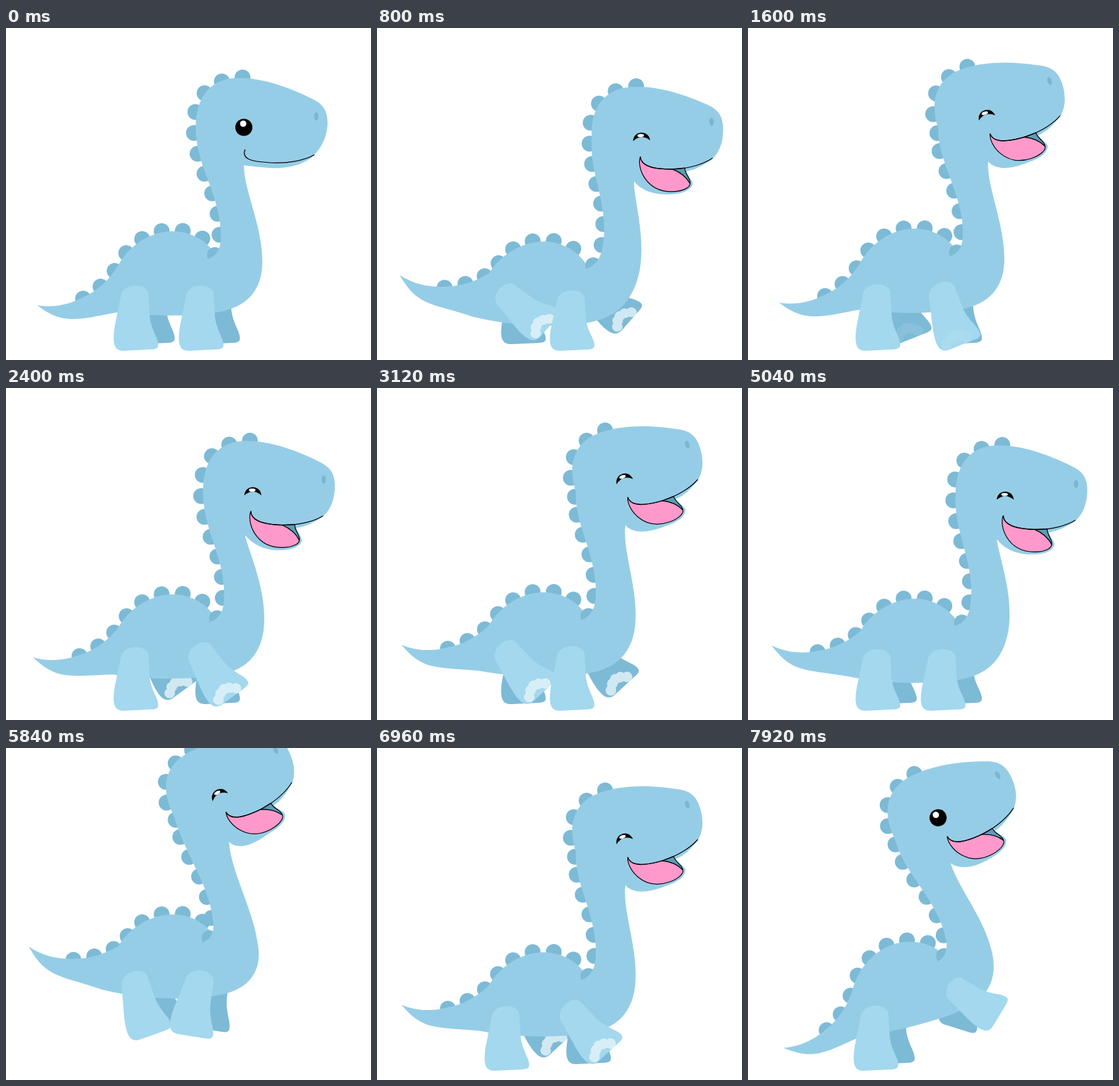
An HTML page for the animation above (8000 ms loop, 554x503 px).

```html
<!DOCTYPE html>
<html lang="en">
<head>
<meta charset="utf-8">
<title>Happy dinosaur</title>
<style>
html, body { margin: 0; width: 100%; height: 100%; overflow: hidden; background: #fff; }
svg { display: block; width: 100vw; height: 100vh; }
</style>
</head>
<body>
<svg viewBox="0 0 554 503" preserveAspectRatio="none">
  <g id="farLegs"></g>
  <g id="backBumps"></g>
  <path id="body" fill="#96cde6"/>
  <g id="neckBumps"></g>
  <path id="neck" fill="#96cde6"/>
  <g id="face">
    <ellipse cx="471" cy="134" rx="3.2" ry="6.2" fill="#7ab5d2"/>
    <g id="eyeOpen">
      <circle cx="361" cy="150.5" r="13"/>
      <circle cx="360" cy="145" r="4.8" fill="#fff"/>
    </g>
    <g id="eyeShut">
      <path d="M350.5 158C352 141.5 375 141.5 376.5 158C368 150.5 359 150.5 350.5 158Z"/>
      <ellipse cx="362.5" cy="150" rx="5" ry="2.4" fill="#fff"/>
    </g>
    <path id="smile" d="M363 184C357 198 372 202 395 203.5C425 207 455 200 468 192" fill="none" stroke="#000" stroke-width="1.2"/>
    <g id="laugh" stroke="#000" stroke-width="1.2" stroke-linejoin="round">
      <path d="M408 203L427 202C427 212 436 219 434 226C429 216 420 208 408 203Z" fill="#5f9db5"/>
      <path d="M360.5 182C354 197 366 237 408 237C425 237 434 231 434 226C429 216 420 208 408 203C385 202 361 199 360.5 182Z" fill="#ff99cb"/>
      <path d="M360.5 182C361 199 390 203 412 203C435 203 457 197 470 189" fill="none"/>
    </g>
  </g>
  <g id="nearLegs"></g>
</svg>
<script>
const $ = id => document.getElementById(id);
const LOOP = 8000, STEP = 80, CYCLE = 1280, START = 160, LAUGH = 240;
const JUMP = 4000, WALK = 6560, REAR = 7360, REARED = 7760, OPEN_EYE = 7920;
const DARK = '#7dbad6', LIGHT = '#a3d8ee';

const BODY = 'M47 420C75 425 100 417 117 408C140 398 158 380 170 360C190 324 225 308 252 308C285 308 308 326 320 346L360 400C350 420 325 432 290 434C250 437 205 436 168 431C140 436 120 441 100 441C78 441 62 431 47 420Z';
const NAPE = 'M308 349C318 346 326 336 326 318C327 290 318 262 310 240C300 212 288 185 288 150C288 115 302 80 345 76C385 73 430 90 462 106C480 114 488 124 488 143';
const JAW_SHUT = 'C488 165 478 182 468 192C455 207 425 214 400 212C385 211 370 209 361 208';
const JAW_OPEN = 'C488 165 481 180 470 190C455 200 442 206 429 207C432 216 439 222 438 227C434 238 418 241 404 241C385 241 367 235 352 218';
const CHEST = 'C361 245 389 300 389 352C390 385 376 412 345 424C325 432 300 434 280 434L270 400Z';
const LEG = 'M273 407C275 386 312 385 315 402L317 436C319 458 331 470 330 481Q330 487 318 487L277 489C263 489 260 478 264 452Z';
const BACK_RIDGE = 'M117 410C140 398 158 380 170 360C190 322 225 306 252 306C272 306 288 312 298 319';
const NECK_RIDGE = 'M317 344C322 337 324 328 324 318C325 290 318 262 309 240C298 212 285 185 285 150C285 115 300 78 359 75';

const clamp = v => Math.min(1, Math.max(0, v));
const mix = (a, b, k) => a + (b - a) * k;
const ease = (a, b, v) => {
  const u = clamp((v - a) / (b - a));
  return u * u * (3 - 2 * u);
};
// Eases up from a to b and down from c to d
const swell = (a, b, c, d, v) => ease(a, b, v) - ease(c, d, v);

function add(parent, tag, attrs) {
  const el = document.createElementNS('http://www.w3.org/2000/svg', tag);
  for (const k in attrs) el.setAttribute(k, attrs[k]);
  return parent.appendChild(el);
}

// Evenly spaced bumps along a ridge
function addBumps(parent, ridge, count) {
  const path = add(parent, 'path', { d: ridge, fill: 'none' });
  const gap = path.getTotalLength() / (count - 1);
  return Array.from({ length: count }, (_, i) => {
    const { x, y } = path.getPointAtLength(i * gap);
    return { x, y, el: add(parent, 'circle', { r: 12, fill: DARK }) };
  });
}

function addLeg(far, front) {
  const el = add($(far ? 'farLegs' : 'nearLegs'), 'g', {});
  add(el, 'path', { d: LEG, fill: far ? DARK : LIGHT });
  const puff = add(el, 'g', { fill: '#e6f4fa' });
  for (let i = 0; i < 5; i++)
    add(puff, 'circle', { cx: 277 + i * 8, cy: 480 - 9 * Math.sin(i * Math.PI / 4), r: 8 });
  return { far, front, el, puff };
}

const backBumps = addBumps($('backBumps'), BACK_RIDGE, 8);
const neckBumps = addBumps($('neckBumps'), NECK_RIDGE, 11);
const legs = [addLeg(true, true), addLeg(true, false), addLeg(false, false), addLeg(false, true)];

function turn(x, y, cx, cy, deg) {
  const a = deg * Math.PI / 180, c = Math.cos(a), s = Math.sin(a);
  return [cx + (x - cx) * c - (y - cy) * s, cy + (x - cx) * s + (y - cy) * c];
}

function warp(d, fn) {
  return d.replace(/([\d.]+) ([\d.]+)/g, (_, x, y) =>
    fn(+x, +y).map(v => v.toFixed(2)).join(' '));
}

function place(bumps, fn) {
  for (const { x, y, el } of bumps) {
    const [cx, cy] = fn(x, y);
    el.setAttribute('cx', cx);
    el.setAttribute('cy', cy);
  }
}

const show = (id, on) => $(id).setAttribute('display', on ? 'inline' : 'none');

// look: head raised, lean: neck forward, air: height of the jump
function walkPose(p) {
  return {
    look: swell(0, .125, .31, .56, p),
    lean: 38 * swell(.16, .56, .56, .85, p),
    air: 0
  };
}

function jumpPose(p) {
  const air = Math.sin(Math.PI * clamp((p - .28) / .44));
  const squat = swell(0, .12, .14, .28, p) + .9 * swell(.72, .8, .82, 1, p);
  return { look: 1.72 * air, lean: 28 * squat - 29 * air, air };
}

function draw(t) {
  const jumping = t >= JUMP && t < WALK;
  const time = Math.max(0, t - START);
  const rear = ease(REAR, REARED, t);
  const pose = (jumping ? jumpPose : walkPose)(time / CYCLE % 1);
  const look = mix(pose.look, .72, rear);
  const lean = pose.lean * (1 - rear);
  const air = pose.air;

  const lift = -55 * air;
  const sink = .45 * Math.max(0, lean) - 4 * look;
  const sway = Math.abs(lean);
  const tail = .65 * sway + 5 * look * ease(0, 12, sway);
  const tilt = -14 * rear;
  const nod = -18 * look;

  const torso = (x, y) => {
    const [tx, ty] = turn(x, y, 268, 307, tilt);
    return [tx - 27 * rear, ty + sink + lift - 13 * rear];
  };
  const trunk = (x, y) => torso(...turn(x, y, 185, 360, tail * clamp((190 - x) / 30)));
  const head = (x, y) => {
    const [hx, hy] = turn(x, y, 361, 150, nod);
    return torso(hx + 1.07 * lean - 3 * look - 10 * air, hy - 16.5 * look);
  };
  const neck = (x, y) => {
    const w = clamp((178 - y + .9 * (x - 285)) / 30);
    const bend = lean * clamp((390 - y) / 196) ** .8;
    const a = torso(x + bend, y), b = head(x, y);
    return [mix(a[0], b[0], w), mix(a[1], b[1], w)];
  };

  const laughing = t >= LAUGH;
  const shut = laughing && t < OPEN_EYE;
  $('body').setAttribute('d', warp(BODY, trunk));
  $('neck').setAttribute('d', warp(NAPE + (laughing ? JAW_OPEN : JAW_SHUT) + CHEST, neck));
  place(backBumps, trunk);
  place(neckBumps, neck);
  $('face').setAttribute('transform',
    `translate(${head(361, 150)}) rotate(${nod + tilt}) translate(-361 -150)`);
  show('eyeOpen', !shut);
  show('eyeShut', shut);
  show('smile', !laughing);
  show('laugh', laughing);

  const stride = jumping ? 0 : Math.sin(time / CYCLE * Math.PI) * (1 - rear);
  const stretch = 1 - sink * .005 * (1 - rear);
  for (const { far, front, el, puff } of legs) {
    const swing = -48 * Math.max(0, far === front ? stride : -stride);
    const raise = front ? rear : 0;
    const angle = swing + (front ? 13 : -18) * air + (far ? 20 : -56) * raise;
    const x = (far ? 25 : 0) - (front ? 0 : 99 + 3 * rear) + 20 * raise;
    const y = (far ? -10 : 0) + lift + .2 * swing - 42 * raise;
    el.setAttribute('transform',
      `translate(${x} ${y + 489}) scale(1 ${stretch}) translate(298 -84)` +
      ` rotate(${angle}) scale(${1 - .08 * raise}) translate(-298 -405)`);
    puff.setAttribute('opacity', .8 * clamp((-swing - 16) / 16));
  }
}

function frame() {
  const t = performance.now() % LOOP;
  draw(Math.floor(t / STEP) * STEP);
  requestAnimationFrame(frame);
}
frame();
</script>
</body>
</html>
```
